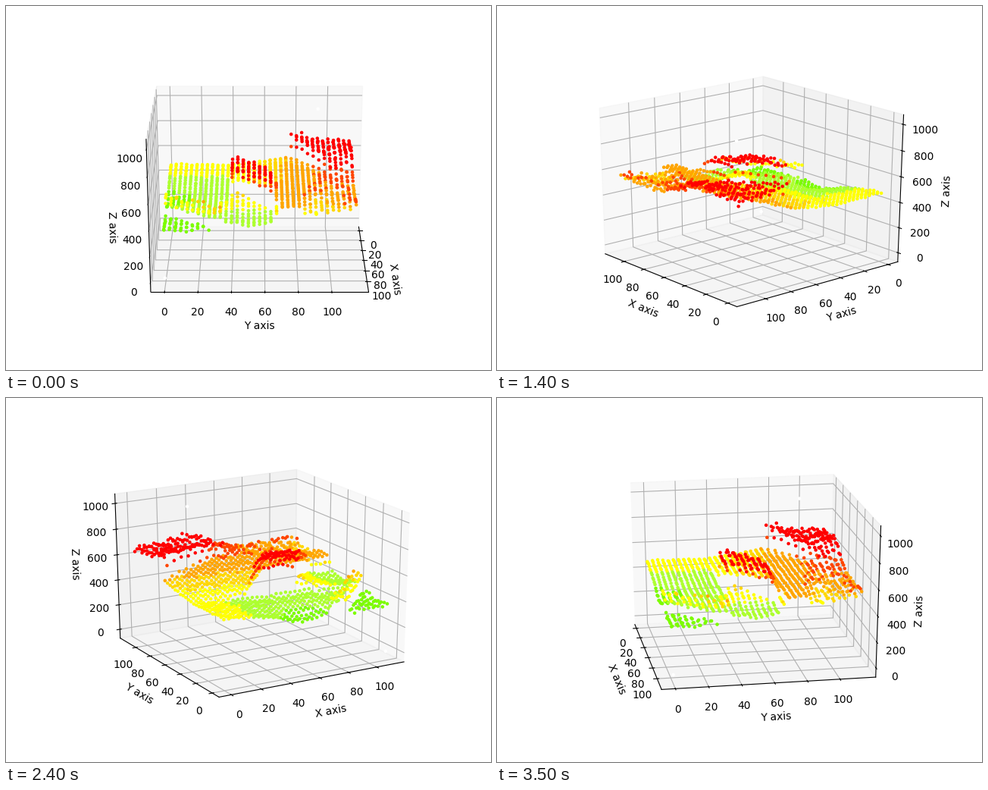
Recreate the animation shown at these times as a matplotlib script. Size 640x480 px, loop 3600 ms.

```python
import numpy as np
import matplotlib.pyplot as plt
from matplotlib.animation import FuncAnimation
from mpl_toolkits.mplot3d import Axes3D

STEPS = 36
ELEV = 22
X_MAX, Y_MAX, Z_MAX = 111.5, 113.7, 1000
LEVELS = [400, 450, 500, 528, 565, 632]
COLORS = np.array(["lawngreen", "greenyellow", "yellow", "gold",
                   "orange", "orangered", "red"])


class WideAxes3D(Axes3D):
    """3D axes that fill their whole rectangle instead of a square."""

    def apply_aspect(self, position=None):
        pass


def ramp(v, a, b):
    t = np.clip((v - a) / (b - a), 0, 1)
    return t * t * (3 - 2 * t)


def bump(x, y, cx, cy, sx, sy):
    return np.exp(-((x - cx) / sx) ** 2 - ((y - cy) / sy) ** 2)


def mix(a, b, w):
    return a + (b - a) * w


def height(x, y, rng):
    def noise(sigma):
        return rng.normal(0, sigma, x.shape)

    # low sheet: sinks with x, climbs beyond y = 40
    low = 475 - 55 * ramp(x, -10, 55) - 65 * bump(x, y, 54, 0, 18, 14)
    climb = 475 + 1.45 * np.maximum(y - 40, 0) + 0.2 * x
    z = mix(low, climb, ramp(y, 34, 43)) + noise(4)

    # bowl at the far x side
    bowl = 480 - ramp(x, 82, 104) * (42 + 32 * bump(x, y, x, 51, 1, 10))
    inside = ramp(x, 78, 84) * ramp(y, 28, 33) * ramp(-y, -69, -64)
    z = mix(z, bowl + noise(5), inside)

    # narrow crest and the low corner behind it
    across = x - y - 77
    crest = (x > 70) & (np.abs(across) < 5) & (y < 34)
    z = np.where(crest, 488 + 0.9 * y + noise(15), z)
    z = mix(z, 374 - 0.25 * across + noise(11), ramp(across, 3, 9))

    # raised band starting with a sharp edge
    mid = 57 + 0.95 * (y - 42)
    top = 690 - 1.3 * (y - 42) - 2 * np.maximum(x - mid, 0)
    inside = ramp(y, 38, 41) * ramp(-y, -70, -62) * ramp(-np.abs(x - mid), -18, -13)
    z = mix(z, top + noise(9), inside)

    # high sheet: drops with x, dips at its far side
    high = 718 - 2.3 * (y - 75) + 40 * ramp(y, 100, 113)
    high += 28 * bump(x, y, 35, 112, 14, 14) - 112 * ramp(x, 28, 80)
    high -= 85 * bump(x, y, 114, 86, 22, 13)
    edge = np.where(x > 50, np.maximum(100 - 0.3 * (x - 50), 66), 75 + 0.5 * x)
    return mix(z, high + noise(14), ramp(y, edge - 2, edge + 2))


def padded(top):
    pad = top * (0.05 + 1.1 / 48)
    return -pad, top + pad


rng = np.random.default_rng(4)
gx, gy = np.meshgrid(np.linspace(0, X_MAX, 35), np.linspace(0, Y_MAX, 35))
xs, ys = gx.ravel(), gy.ravel()
zs = height(xs, ys, rng)
cs = COLORS[np.digitize(zs, LEVELS)]

# two white marks hold the full height range
xs = np.append(xs, [26, X_MAX])
ys = np.append(ys, [93, 0])
zs = np.append(zs, [Z_MAX, 0])
cs = np.append(cs, ["white", "white"])

fig = plt.figure(figsize=(6.4, 4.8), dpi=100)
ax = WideAxes3D(fig, rect=(0.125, 0.11, 0.775, 0.77), auto_add_to_figure=False)
fig.add_axes(ax)
ax.set_box_aspect((1, 1, 1), zoom=np.sqrt(3) / 1.8294640721620434)
ax.scatter(xs, ys, zs, c=list(cs), marker=".", s=20, depthshade=False)

ax.set_xlim(*padded(X_MAX))
ax.set_ylim(*padded(Y_MAX))
ax.set_zlim(*padded(Z_MAX))
ax.set_xticks(range(0, 101, 20))
ax.set_yticks(range(0, 101, 20))
ax.set_xlabel("X axis")
ax.set_ylabel("Y axis")
ax.set_zlabel("Z axis")


def turn(i):
    ax.view_init(elev=ELEV, azim=i * 360 / STEPS)
    return []


anim = FuncAnimation(fig, turn, frames=STEPS, interval=100,
                     repeat=True, repeat_delay=0, blit=False)
plt.show()
```
